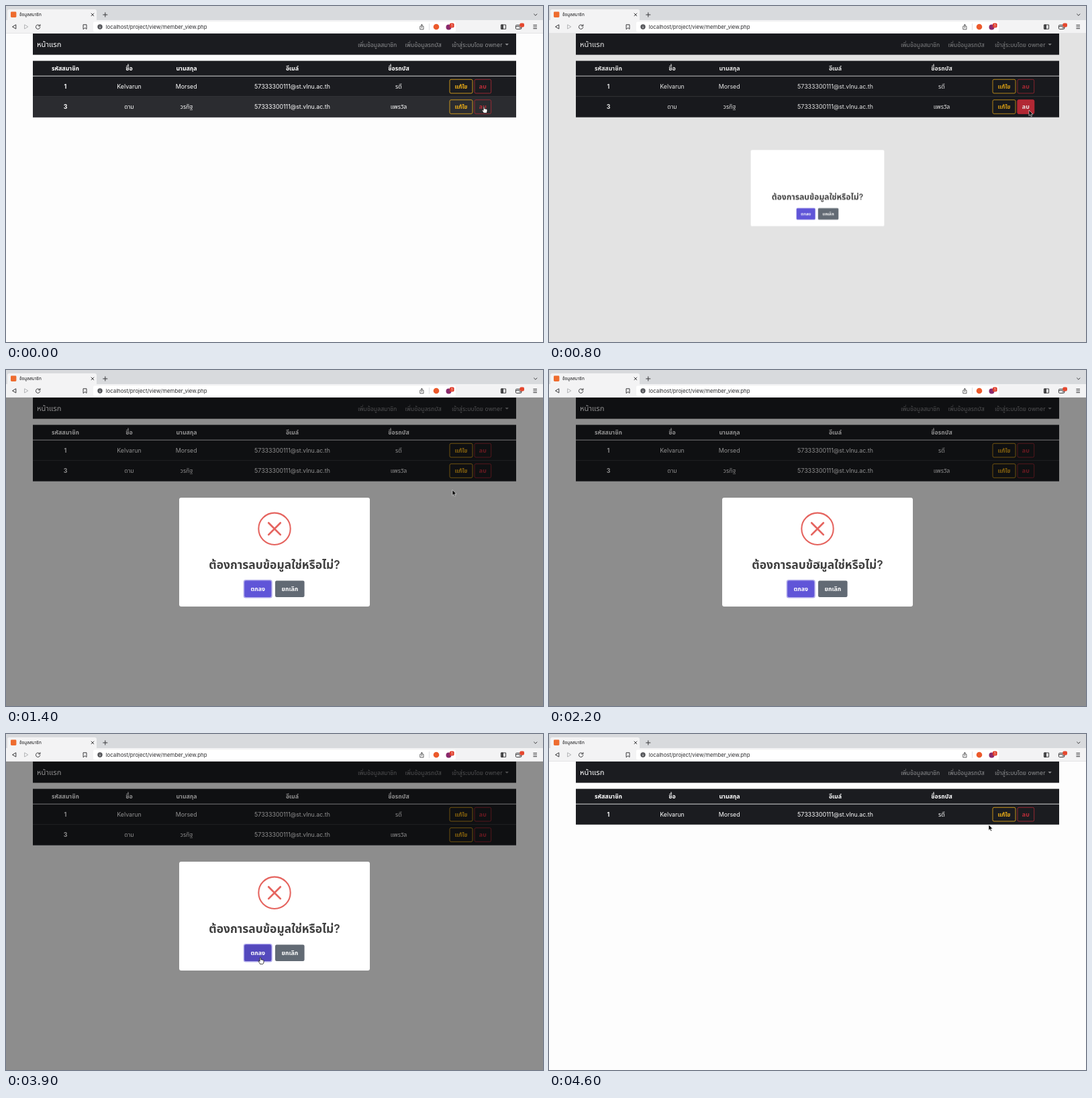
An HTML page that plays this animation: 800x500 px, repeating every 4700 ms.

```html
<!DOCTYPE html>
<html lang="th">
<head>
<meta charset="utf-8">
<title>ข้อมูลสมาชิก</title>
<style>
html, body { margin: 0; width: 100%; height: 100%; overflow: hidden; background: #fdfdfd; }
svg { display: block; width: 800px; height: 500px; font: 8.8px Inter, "Noto Sans Thai Looped", Loma, "Noto Sans Thai", "Noto Sans", sans-serif; }
text { fill: #fff; }
.mid { text-anchor: middle; }
.bold { font-weight: 700; }
.nav text { fill: #8d8e90; }
.icon { fill: none; stroke: #3a3a3c; stroke-width: 1; stroke-linecap: round; stroke-linejoin: round; }

/* 47 ticks of 100 ms: one tick is 2.1277 % */
.anim { animation: 4.7s step-end infinite; }
#row2 { animation-name: row2; }
#hover { animation-name: hover; }
#press { animation-name: press; }
#shade { animation-name: shade; }
#modal { animation-name: modal; transform-origin: 400px 271px; }
#ring { animation-name: ring; transform-origin: 400px 236px; }
#cross { animation-name: cross; transform-origin: 400px 236px; }
#choices { animation-name: choices; }
#focus { animation-name: focus; }
#okHover { animation-name: okHover; }
.ready { animation-name: ready; }
.loading { animation-name: loading; }
#pointer { animation-name: pointer; }
#arrow { animation-name: arrow; }
#hand { animation-name: hand; }
#beam { animation-name: beam; }

@keyframes row2 { 0% { opacity: 1 } 89.36%, 100% { opacity: 0 } }
@keyframes hover { 0% { opacity: 1 } 14.89%, 100% { opacity: 0 } }
@keyframes press {
  0% { opacity: 0 } 2.12% { opacity: .75 } 4.25% { opacity: 1 }
  19.14% { opacity: .45 } 21.27%, 100% { opacity: 0 }
}
@keyframes shade {
  0% { opacity: 0 } 17.02% { opacity: .1 } 19.14% { opacity: .43 } 21.27% { opacity: .445 }
  85.1% { opacity: .205 } 87.23%, 100% { opacity: 0 }
}
@keyframes modal {
  0% { opacity: 0; transform: scale(.7) }
  17.02% { opacity: 1; transform: scale(.7) }
  19.14% { opacity: 1; transform: scale(.979) }
  21.27% { opacity: 1; transform: scale(.998) }
  23.4% { opacity: 1; transform: scale(.987) }
  25.53% { opacity: 1; transform: none }
  85.1% { opacity: .48; transform: scale(.713) }
  87.23%, 100% { opacity: 0; transform: scale(.5) }
}
@keyframes ring {
  0% { opacity: 0; transform: scaleY(.1) }
  19.14% { opacity: .3; transform: scaleY(.2) }
  21.27% { opacity: .6; transform: scaleY(.75) }
  23.4% { opacity: .83; transform: scaleY(.96) }
  25.53%, 100% { opacity: 1; transform: none }
}
@keyframes cross {
  0% { opacity: 0; transform: translateY(14px) scale(.4) }
  23.4% { opacity: .1; transform: translateY(12px) scale(.48) }
  25.53% { opacity: .76; transform: translateY(-2px) scale(1.1) }
  27.65% { opacity: .97; transform: translateY(-.4px) scale(1.02) }
  29.78%, 100% { opacity: 1; transform: none }
}
@keyframes choices { 0% { opacity: 1 } 85.1%, 100% { opacity: .45 } }
@keyframes focus { 0% { opacity: 0 } 19.14% { opacity: 1 } 85.1%, 100% { opacity: 0 } }
@keyframes okHover { 0% { opacity: 0 } 61.7% { opacity: 1 } 85.1%, 100% { opacity: 0 } }
@keyframes ready { 0% { opacity: 1 } 85.1% { opacity: 0 } 89.36%, 100% { opacity: 1 } }
@keyframes loading { 0% { opacity: 0 } 85.1% { opacity: 1 } 89.36%, 100% { opacity: 0 } }
@keyframes pointer {
  0% { transform: translate(712px, 149px); animation-timing-function: steps(6) }
  12.76% { transform: translate(715px, 155px) }
  25.53% { transform: translate(715px, 155px); animation-timing-function: steps(3) }
  31.91% { transform: translate(640px, 190px); animation-timing-function: steps(3) }
  38.29% { transform: translate(480px, 262px); animation-timing-function: steps(3) }
  44.68% { transform: translate(402px, 290px) }
  53.19% { transform: translate(402px, 290px); animation-timing-function: steps(6) }
  65.95% { transform: translate(379px, 332px) }
  91.48% { transform: translate(402px, 318px) }
  93.61% { transform: translate(520px, 230px) }
  95.74% { transform: translate(630px, 152px) }
  97.87%, 100% { transform: translate(655px, 135px) }
}
@keyframes arrow {
  0% { opacity: 0 } 17.02% { opacity: 1 } 42.55% { opacity: 0 }
  57.44% { opacity: 1 } 61.7% { opacity: 0 } 85.1%, 100% { opacity: 1 }
}
@keyframes hand {
  0% { opacity: 1 } 17.02% { opacity: 0 } 61.7% { opacity: 1 } 85.1%, 100% { opacity: 0 }
}
@keyframes beam { 0% { opacity: 0 } 42.55% { opacity: 1 } 57.44%, 100% { opacity: 0 } }
</style>
</head>
<body>
<svg viewBox="0 0 800 500">
  <defs>
    <g id="actions" class="mid bold" fill="none" stroke-width=".9">
      <rect x="661" y="109.3" width="34" height="20.6" rx="2" stroke="#d9a01c"/>
      <rect x="698" y="109.3" width="24.7" height="20.6" rx="2" stroke="#a32a35"/>
      <text x="678" y="122.7" style="fill:#eaac17">แก้ไข</text>
      <text x="710.3" y="122.7" style="fill:#bb2d39">ลบ</text>
    </g>
  </defs>

  <rect width="800" height="500" fill="#fdfdfd"/>

  <!-- page -->
  <rect x="40" y="41" width="720" height="31.6" fill="#1b1c20"/>
  <text x="46" y="61.3" style="font-size:11.2px;font-weight:500">หน้าแรก</text>
  <g class="nav">
    <text x="524" y="60.7">เพิ่มข้อมูลสมาชิก</text>
    <text x="594.5" y="60.7">เพิ่มข้อมูลรถบัส</text>
    <text x="739.5" y="60.7" text-anchor="end">เข้าสู่ระบบโดย owner</text>
    <path d="M743.5 56h5.4l-2.7 2.8z" fill="#8d8e90"/>
  </g>

  <rect x="40" y="81.6" width="720" height="53.2" fill="#1b1c20"/>
  <g class="mid bold">
    <text x="88.5" y="96.2">รหัสสมาชิก</text>
    <text x="183.5" y="96.2">ชื่อ</text>
    <text x="269" y="96.2">นามสกุล</text>
    <text x="426.5" y="96.2">อีเมล์</text>
    <text x="585" y="96.2">ชื่อรถบัส</text>
  </g>
  <rect x="40" y="103.7" width="720" height="1" fill="#d6d6d7"/>
  <g class="mid">
    <text class="bold" x="88.5" y="122.8">1</text>
    <text x="183.5" y="122.8">Kelvarun</text>
    <text x="268.7" y="122.8">Morsed</text>
    <text x="426.5" y="122.8">57333300111@st.vlnu.ac.th</text>
    <text x="585" y="122.8">รตี</text>
  </g>
  <use href="#actions"/>

  <g id="row2" class="anim">
    <rect x="40" y="134.8" width="720" height="30.6" fill="#1b1c20"/>
    <rect id="hover" class="anim" x="40" y="134.8" width="720" height="30.6" fill="#2b2c30"/>
    <path d="M40 134.8h720M40 165.2h720" stroke="#2b2d31" stroke-width=".6"/>
    <g class="mid">
      <text class="bold" x="88.5" y="153.2">3</text>
      <text x="183.5" y="153.2">ดาม</text>
      <text x="269" y="153.2">วรทิฐ</text>
      <text x="426.5" y="153.2">57333300111@st.vlnu.ac.th</text>
      <text x="585" y="153.2">แพรวัล</text>
    </g>
    <use href="#actions" y="30.4"/>
    <g id="press" class="anim mid bold">
      <rect x="697.5" y="139.3" width="25.7" height="21.4" rx="2.5" fill="#c62c3a"/>
      <text x="710.3" y="153.1">ลบ</text>
    </g>
  </g>

  <!-- dialog -->
  <rect id="shade" class="anim" y="41" width="800" height="459"/>
  <g id="modal" class="anim">
    <rect x="258" y="190" width="284" height="162" rx="3" fill="#fff"/>
    <g fill="none" stroke="#e5645f">
      <circle id="ring" class="anim" cx="400" cy="236.3" r="23.7" stroke-width="2.1"/>
      <path id="cross" class="anim" d="M391.2 227.5l17.6 17.6m0-17.6l-17.6 17.6" stroke-width="2.7" stroke-linecap="round"/>
    </g>
    <text class="mid" x="400" y="296" style="font-size:17.4px;font-weight:600;fill:#404040">ต้องการลบข้อมูลใช่หรือไม่?</text>
    <g id="choices" class="anim mid bold">
      <rect id="focus" class="anim" x="353.6" y="312" width="43.2" height="27.6" rx="3.6" fill="#b4aeec"/>
      <rect x="355.2" y="313.6" width="40" height="24.4" rx="2.2" fill="#6055d8"/>
      <rect id="okHover" class="anim" x="355.2" y="313.6" width="40" height="24.4" rx="2.2" fill="#5449bd"/>
      <rect x="401" y="313.6" width="43.6" height="24.4" rx="2.2" fill="#626a74"/>
      <text x="375.2" y="329">ตกลง</text>
      <text x="422.8" y="329">ยกเลิก</text>
    </g>
  </g>

  <!-- browser -->
  <rect width="800" height="21" fill="#d8dadd"/>
  <path d="M2 22V8q0-3 3-3H132q3 0 3 3V22z" fill="#f3f3f4"/>
  <rect y="21" width="800" height="20" fill="#f3f3f4"/>
  <rect y="40.5" width="800" height=".5" fill="#d4d4d6"/>
  <rect x="130" y="23.5" width="540" height="15" rx="2" fill="#fff"/>
  <rect class="anim ready" x="7" y="8.6" width="8.4" height="8.4" rx="1.4" fill="#ee6c2f"/>
  <path class="anim loading icon" d="M9.6 10.4q.8-.8 1.9-.9" style="stroke:#b9babc"/>
  <text x="20" y="15.3" style="font-size:6.5px;font-weight:500;fill:#1c1c1e">ข้อมูลสมาชิก</text>
  <g class="icon">
    <path d="M127 11l3.8 3.8m0-3.8l-3.8 3.8M144.7 13h6.2m-3.1-3.1v6.2M786.6 12l2.2 2.2 2.2-2.2"/>
    <path d="M14.8 28.2v5.8l-4.9-2.9z"/>
    <path d="M27.6 28.2v5.8l4.9-2.9z" stroke="#b2b3b5"/>
    <path class="anim ready" d="M50.2 29.2a3.2 3.2 0 1 0 .6 2.6M50.9 27.6v2.3h-2.3"/>
    <path class="anim loading" d="M44.9 28.3l5.6 5.6m0-5.6l-5.6 5.6"/>
    <path d="M115.4 27.8h4.6v6.6l-2.3-1.9-2.3 1.9z"/>
    <path d="M618 30.2h-1.2v4.6h5.2v-4.6h-1.2M619.4 32.4v-4.8m-1.5 1.4l1.5-1.5 1.5 1.5" stroke-width=".8"/>
    <path d="M630.5 26.5v9" stroke="#d2d2d4" stroke-width=".7"/>
    <path d="M737.8 28h6.8v6.2h-6.8z"/>
    <path d="M738.4 28h2v6.2h-2z" fill="#3a3a3c"/>
    <path d="M766 28.4h-5.4q-1.2 0-1.2 1.2v3.6q0 1.2 1.2 1.2h6q1.2 0 1.2-1.2v-2.8h-8M765 32.4h2.6"/>
    <path d="M785.8 28.4h4.8m-4.8 2.6h4.8m-4.8 2.6h4.8"/>
  </g>
  <circle cx="140" cy="31" r="3.7" fill="#55565a"/>
  <path d="M140 30.6v2.2m0-3.8v.4" stroke="#fff" stroke-width="1"/>
  <text x="148.7" y="33.8" style="font-size:7.8px;fill:#2c2c2e">localhost/project/view/member_view.php</text>
  <circle cx="641" cy="31" r="4.3" fill="#ec5a2c"/>
  <circle cx="659.5" cy="31.5" r="4" fill="#8a2a6c"/>
  <rect x="661" y="25.6" width="6.6" height="6.6" rx="1.6" fill="#e0402f"/>
  <text class="mid" x="664.3" y="30.9" style="font-size:5px">1</text>
  <rect x="765.4" y="25.4" width="6.6" height="6" rx="1.8" fill="#e5482f"/>

  <!-- pointer -->
  <g id="pointer" class="anim">
    <path id="arrow" class="anim" d="M0 0v8.4l1.9-1.8 1.3 3 1.4-.6-1.3-2.9h2.7z" fill="#000" stroke="#fff" stroke-width=".6"/>
    <path id="hand" class="anim" d="M-.9 1q.9-1.4 1.8 0v3q.9-.6 1.6.2.9-.5 1.4.4 1.1-.2 1.1.9v1.6q0 2.4-1.2 3.2H-.6Q-1 8.6-2.9 6.6q-.4-1.3 1-1l1 .8z" fill="#fff" stroke="#111" stroke-width=".8" stroke-linejoin="round"/>
    <path id="beam" class="anim icon" d="M-1.6-4.6Q0-4.6 0-3.6q0-1 1.6-1M0-3.6v7.2M-1.6 4.6Q0 4.6 0 3.6q0 1 1.6 1M-1 .9h2" style="stroke-width:.8"/>
  </g>
</svg>
</body>
</html>
```
